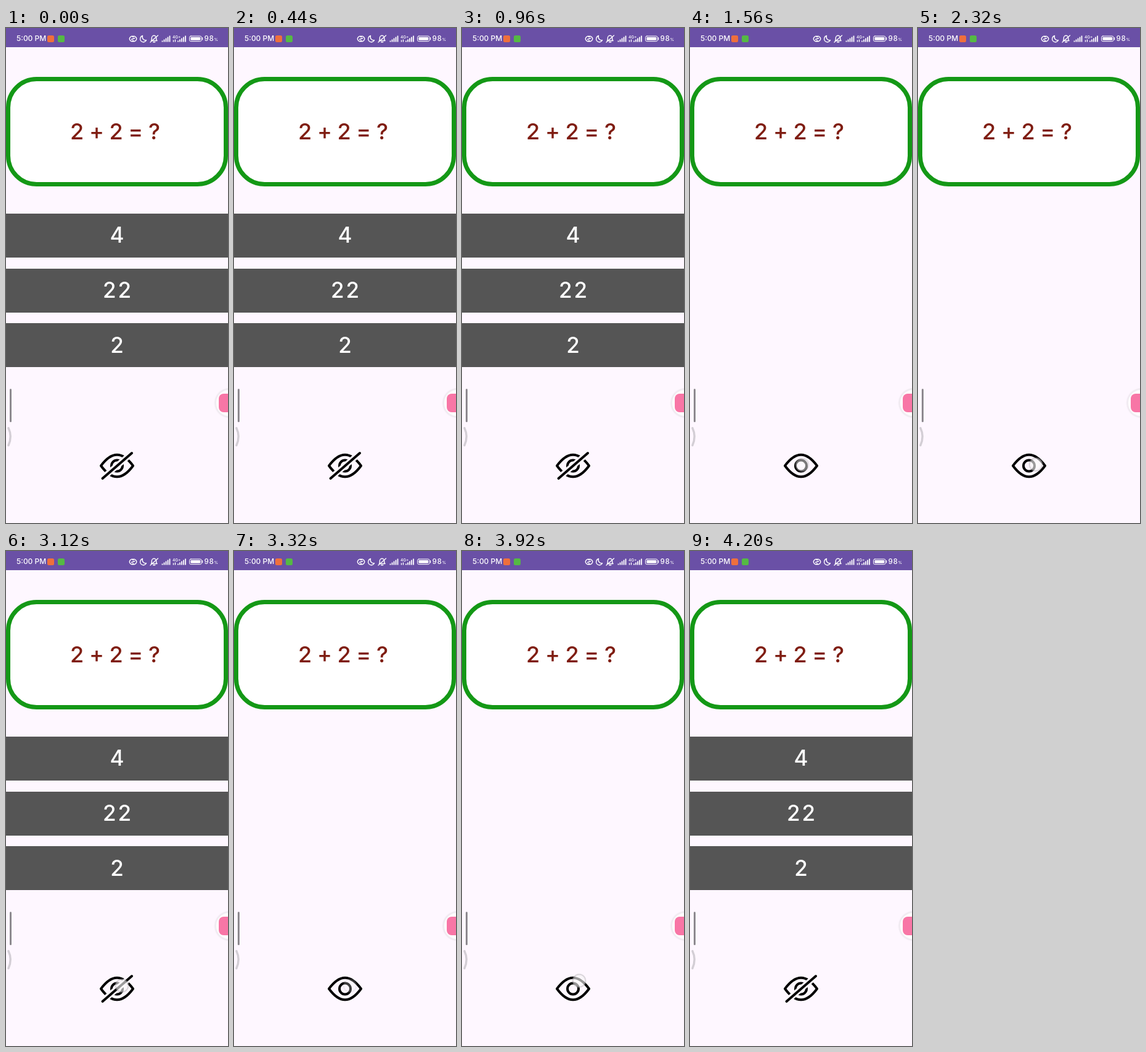
Recreate the animation shown at these times as an HTML page. Size 360 by 800 pixels, loop 4680 ms.

```html
<!DOCTYPE html>
<html lang="en">
<head>
<meta charset="utf-8">
<title>Quiz with hidden answers</title>
<style>
  html, body { margin: 0; width: 100%; height: 100%; overflow: hidden; background: #fef7ff; }
  svg { display: block; width: 360px; height: 800px; }
  text { font-family: Inter, Roboto, sans-serif; font-weight: 500; fill: #fff; }
  .line { fill: none; stroke: #fff; stroke-linecap: round; stroke-linejoin: round; }
  .big { font-size: 35px; letter-spacing: 3px; text-anchor: middle; }
  .question { font-size: 36px; word-spacing: -7px; fill: #7f1d12; }
  .eye { fill: none; stroke: #000; stroke-width: 4; stroke-linecap: round; stroke-linejoin: round; }

  .shown, .hidden, .tap { animation: 4680ms step-end infinite; }
  .shown { animation-name: shown; }
  .hidden { animation-name: hidden; opacity: 0; }
  .tap { animation-name: tap; animation-timing-function: linear; opacity: 0; }

  /* toggles at 1.52, 2.4, 3.2 and 4 s */
  @keyframes shown {
    0%, 51.26%, 85.45% { opacity: 1; }
    32.46%, 68.36% { opacity: 0; }
    100% { opacity: 1; }
  }
  @keyframes hidden {
    0%, 51.26%, 85.45% { opacity: 0; }
    32.46%, 68.36% { opacity: 1; }
    100% { opacity: 0; }
  }
  /* press, hold for 130 ms, fade for 200 ms */
  @keyframes tap {
    0% { opacity: 0; }
    0.8%, 2.8% { opacity: 1; }
    7.1%, 100% { opacity: 0; }
  }
</style>
</head>
<body>
<svg viewBox="0 0 360 800">
  <defs>
    <radialGradient id="spot">
      <stop offset="0" stop-color="#fff" stop-opacity=".62"/>
      <stop offset=".72" stop-color="#f4f2f4" stop-opacity=".62"/>
      <stop offset=".86" stop-color="#b4b2b5" stop-opacity=".6"/>
      <stop offset="1" stop-color="#c8c6c9" stop-opacity="0"/>
    </radialGradient>
    <radialGradient id="halo">
      <stop offset=".8" stop-color="#fff"/>
      <stop offset=".9" stop-color="#eee8ef"/>
      <stop offset="1" stop-color="#fef7ff"/>
    </radialGradient>
    <mask id="gap" maskUnits="userSpaceOnUse" x="140" y="670" width="80" height="75">
      <path fill="#fff" d="M140 670h80v75h-80z"/>
      <path stroke="#000" stroke-width="10" d="M150 733L210 682"/>
    </mask>
    <g id="eye">
      <path d="M154 707.5Q180 672 206 707.5Q180 743 154 707.5Z"/>
      <circle cx="180" cy="707.5" r="9"/>
    </g>
    <path id="bars" d="M0 0v-2M3 0v-4M6 0v-6M9 0v-8M12 0v-10"/>
  </defs>

  <rect width="360" height="800" fill="#fef7ff"/>

  <!-- status bar -->
  <rect width="360" height="31" fill="#6a50a6"/>
  <text x="17" y="21.4" font-size="12">5:00 PM</text>
  <rect x="67" y="12" width="11" height="11" rx="2.5" fill="#ef6f3c"/>
  <rect x="84" y="12" width="11" height="11" rx="2.5" fill="#55b944"/>
  <g class="line" stroke-width="1.4">
    <path d="M207 14.4a4 4 0 1 0 0 6.2M205 20.6a4 4 0 1 0 0-6.2M203.5 18.5l5-2"/>
    <path d="M221.5 12.5a5.2 5.2 0 1 0 6 7.2a5.3 5.3 0 0 1-6-7.2z"/>
    <path d="M235.5 20.5h9.5l-1.3-2.2v-2.3a3.7 3.7 0 0 0-7.4 0v2.3zM238.7 22.7h3M234 23L246.5 12"/>
  </g>
  <g class="line" style="stroke-linecap:butt">
    <use href="#bars" x="253.5" y="22.5" stroke-width="1.8"/>
    <use href="#bars" x="279" y="22.5" stroke-width="1.8"/>
    <path d="M271.5 22.5v-3M274.5 22.5v-4" stroke-width="1.4"/>
  </g>
  <text x="270" y="17" font-size="6.5">4G+</text>
  <rect x="297.5" y="13" width="19.5" height="8.6" rx="2.3" class="line" stroke-width="1"/>
  <rect x="299.3" y="14.8" width="15.9" height="5" rx="1" fill="#fff"/>
  <path d="M318.5 15.6v3.4" class="line" stroke-width="1.2"/>
  <text x="321.5" y="21.4" font-size="11.5" letter-spacing=".8">98<tspan font-size="6.5" letter-spacing="0">%</tspan></text>

  <!-- question -->
  <rect x="3.5" y="82.5" width="353" height="170" rx="46" fill="#fff" stroke="#149816" stroke-width="7"/>
  <text class="big question" x="178.5" y="180">2 + 2 = ?</text>

  <!-- answers and slashed eye -->
  <g class="shown">
    <path fill="#555" d="M0 300h360v71H0zM0 389h360v71H0zM0 477h360v71H0z"/>
    <text class="big" x="181.5" y="347">4</text>
    <text class="big" x="181.5" y="436">22</text>
    <text class="big" x="181.5" y="524.5">2</text>
    <g class="eye">
      <use href="#eye" mask="url(#gap)"/>
      <path d="M156.5 728L204 687"/>
    </g>
  </g>
  <g class="hidden eye"><use href="#eye"/></g>

  <!-- edge handles -->
  <rect x="6" y="583" width="3" height="54" rx="1.5" fill="#8d898f"/>
  <path d="M4 646.5Q10.5 660 4 674.5" fill="none" stroke="#d3ced5" stroke-width="3.4" stroke-linecap="round"/>
  <circle cx="362" cy="606" r="25" fill="url(#halo)"/>
  <rect x="345" y="591" width="31" height="30" rx="8" fill="#f876a6"/>

  <!-- taps -->
  <g fill="url(#spot)">
    <circle class="tap" cx="182" cy="706" r="12" style="animation-delay:-3290ms"/>
    <circle class="tap" cx="191" cy="705.5" r="12" style="animation-delay:-2410ms"/>
    <circle class="tap" cx="188" cy="702.5" r="12" style="animation-delay:-1610ms"/>
    <circle class="tap" cx="190" cy="694.5" r="12" style="animation-delay:-810ms"/>
  </g>
</svg>
</body>
</html>
```
